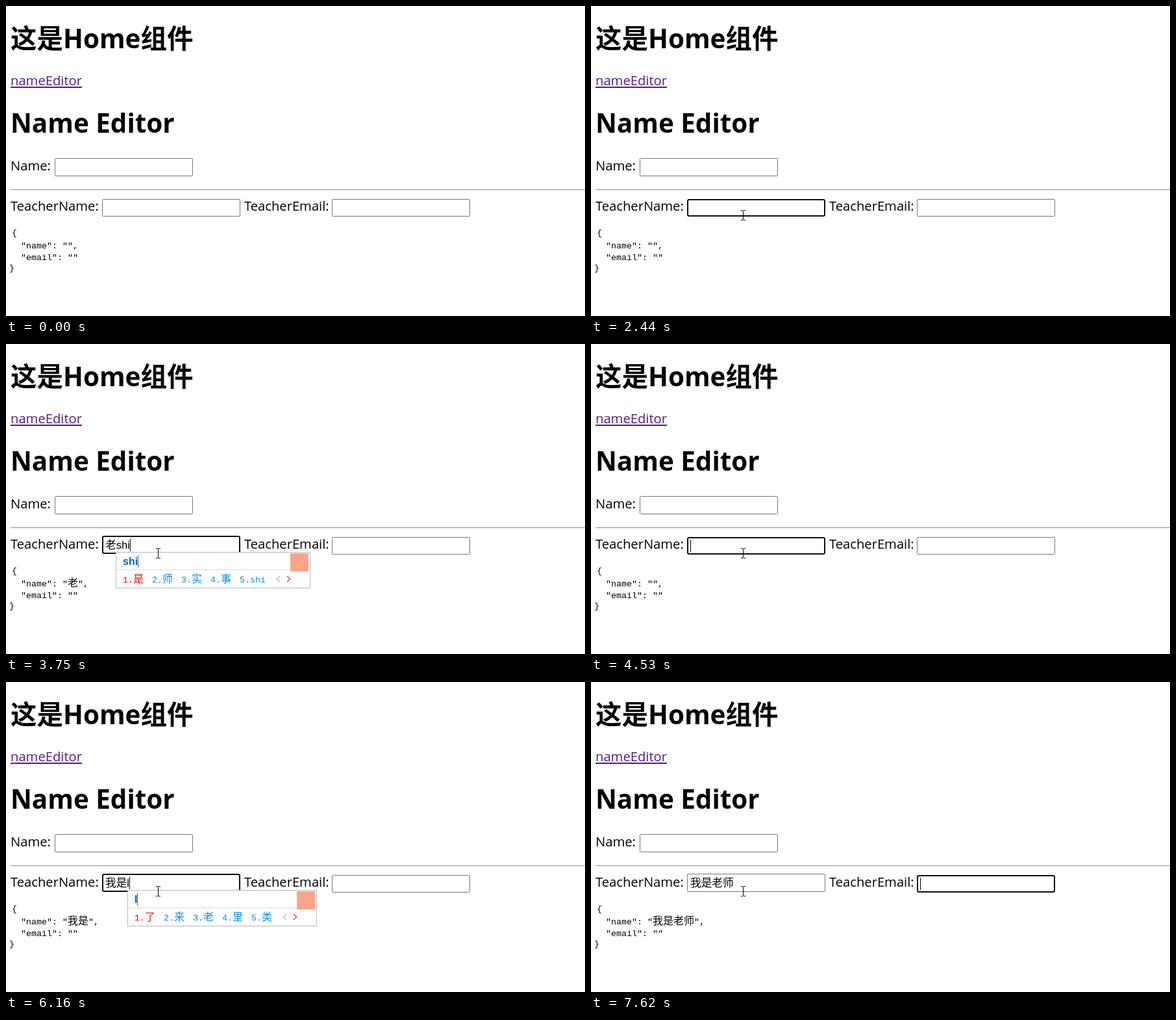
Animation, 892 px wide and 477 px high, one loop 8 s. Source, as an HTML page with a canvas:

```html
<!DOCTYPE html>
<html lang="zh-CN">
<head>
<meta charset="utf-8">
<title>Name Editor</title>
<style>
html, body { margin: 0; width: 100%; height: 100%; overflow: hidden; background: #fff; }
canvas { display: block; }
</style>
</head>
<body>
<canvas id="stage" width="892" height="477"></canvas>
<script>
const ctx = document.getElementById('stage').getContext('2d');
const LOOP = 8000;
const CJK = '"Noto Sans CJK SC", "Noto Sans CJK", "Noto Sans CJK JP", sans-serif';

// Each style pairs a Latin font with a Chinese one.
const style = (latin, cjkSize, weight = '') => ({ latin, cjk: `${weight} ${cjkSize}px ${CJK}` });
const BODY = style('20.2px "Open Sans", sans-serif', 20);
const HEADING = style('bold 40.4px "Open Sans", sans-serif', 40.5, 'bold');
const MONO = style('13.33px "Liberation Mono", monospace', 16);
const FIELD = style('16.67px "Liberation Sans", sans-serif', 16.67);
const PINYIN = style('bold 16px "Liberation Sans", sans-serif', 16);

// time, committed text, letters being composed, candidates
const typing = [
  [0, ''],
  [2820, '', 'l', '了 来 老 里 类'],
  [2890, '', 'la', '啦 拉 辣 蜡 腊'],
  [3050, '', 'lao', '老 劳 唠 捞 牢'],
  [3430, '老'],
  [3510, '老', 's', '是 师 说 上 岁'],
  [3660, '老', 'sh', '是 师 上 说 什么'],
  [3750, '老', 'shi', '是 师 实 事 shi'],
  [3920, '老师'],
  [4380, '老'],
  [4450, ''],
  [5090, '', 'w', '我 为 万 无 王'],
  [5260, '', 'wo', '我 窝 握 喔 卧'],
  [5560, '', 'wos', '我是 我说 我所 我送 我算'],
  [5640, '', 'wosh', '我是 我说 我生活 我说的话 我收到的货物'],
  [5780, '', 'woshi', '我是 卧室 我试 我使 我市'],
  [6010, '我是'],
  [6160, '我是', 'l', '了 来 老 里 类'],
  [6230, '我是', 'la', '啦 拉 辣 蜡 腊'],
  [6320, '我是', 'lao', '老 劳 唠 捞 牢'],
  [6400, '我是', 'laos', '老师 老是 老实 老三 老四'],
  [6540, '我是', 'laosh', '老师 老是 老实 老手 老上海'],
  [6630, '我是', 'laoshi', '老师 老实 老是 老式 老史'],
  [7000, '我是老师'],
];
const FOCUS_NAME = 860, FOCUS_EMAIL = 7620;
const caretHidden = [[1410, 1890], [2440, 2820], [4930, 5090]];

// Draws mixed text and returns the x where it ends.
function write(text, x, y, font, color = '#000') {
  ctx.fillStyle = color;
  for (const run of text.match(/[\x00-\x7f]+|[^\x00-\x7f]+/g) || []) {
    ctx.font = run.charCodeAt(0) < 128 ? font.latin : font.cjk;
    ctx.fillText(run, x, y);
    x += ctx.measureText(run).width;
  }
  return x;
}

function rect(x, y, w, h, color) {
  ctx.fillStyle = color;
  ctx.fillRect(x, y, w, h);
}

function stroke(path, color, width = 1) {
  ctx.strokeStyle = color;
  ctx.lineWidth = width;
  ctx.stroke(new Path2D(path));
}

function field(x, y, h, focused) {
  const line = focused ? 2 : 1;
  ctx.beginPath();
  ctx.roundRect(x + line / 2, y + line / 2, 213 - line, h - line, line);
  ctx.strokeStyle = focused ? '#101010' : '#767676';
  ctx.lineWidth = line;
  ctx.stroke();
}

function drawPage() {
  rect(0, 0, 892, 477, '#fff');
  write('这是Home组件', 7, 65, HEADING);
  write('nameEditor', 7, 122, BODY, '#551a8b');
  rect(7, 124, 110, 2, '#551a8b');
  write('Name Editor', 7, 195, HEADING);
  write('Name:', 7, 253, BODY);
  field(75, 234, 28);
  rect(7, 282, 885, 1, '#9a9a9a');
  rect(7, 283, 885, 1, '#eee');
  write('TeacherName:', 7, 315, BODY);
  write('TeacherEmail:', 367, 315, BODY);
}

function drawJson(name) {
  write('{', 9, 353, MONO);
  write(`"name": "${name}",`, 23, 373, MONO);
  write('"email": ""', 23, 391, MONO);
  write('}', 5, 407, MONO);
}

function drawCandidates(left, letters, words) {
  const extra = words.join('').replace(/[^\x00-\x7f]/g, '##').length * 8 - 80;
  const width = 292 + extra;
  rect(left, 320, width, 56, '#b5b9c0');
  rect(left + 1, 321, width - 2, 54, '#fff');
  rect(left + 1, 347, width - 33, 1, '#dcdcdc');
  rect(left + width - 31, 322, 28, 28, '#fba488');

  const end = write(letters, left + 11, 340, PINYIN, '#0a5cc4');
  rect(Math.round(end), 325, 1, 19, letters.length === 1 ? '#e02020' : '#2a62a8');

  let x = left + 11;
  words.forEach((word, i) => {
    x = write(`${i + 1}.${word}`, x, 367, MONO, i ? '#0090e6' : '#f8060a') + 13;
  });
  const arrow = left + width - 52;
  stroke(`M${arrow + 5} 357l-4.5 4.5l4.5 4.5`, '#c4c4c4', 1.5);
  stroke(`M${arrow + 16} 357l4.5 4.5l-4.5 4.5`, '#e0513c', 1.5);
}

function drawPointer(t) {
  const k = Math.min(Math.floor((t - 220) / 80), 8) / 8;
  const left = (1 - k) ** 2;
  const x = Math.round(234 + 257 * left), y = Math.round(322 + 100 * left);
  stroke(`M${x - 3} ${y - 7.5}h3m1 0h3M${x + 0.5} ${y - 7}v14M${x - 3} ${y + 7.5}h3m1 0h3`, '#000');
}

function draw(t) {
  const [, name, letters = '', candidates] = typing.findLast(step => t >= step[0]);
  const inName = t >= FOCUS_NAME && t < FOCUS_EMAIL;
  const inEmail = t >= FOCUS_EMAIL;

  drawPage();
  // Chinese glyphs make the field slightly taller.
  field(148, name ? 295 : 297, name ? 28 : 27, inName);
  field(502, 297, 27, inEmail);
  drawJson(name);

  const end = write(name + letters, 153, 315, FIELD);
  const hidden = caretHidden.some(([from, to]) => t >= from && t < to);
  if (inName && !hidden) rect(Math.round(end), name ? 300 : 301, 1, 19, '#000');
  if (inEmail) rect(507, 301, 1, 19, '#000');

  if (letters) drawCandidates([153, 169, 187][name.length], letters, candidates.split(' '));
  if (t >= 220) drawPointer(t);
}

const start = performance.now();
function frame() {
  draw((performance.now() - start) % LOOP);
  requestAnimationFrame(frame);
}
frame();
</script>
</body>
</html>
```
